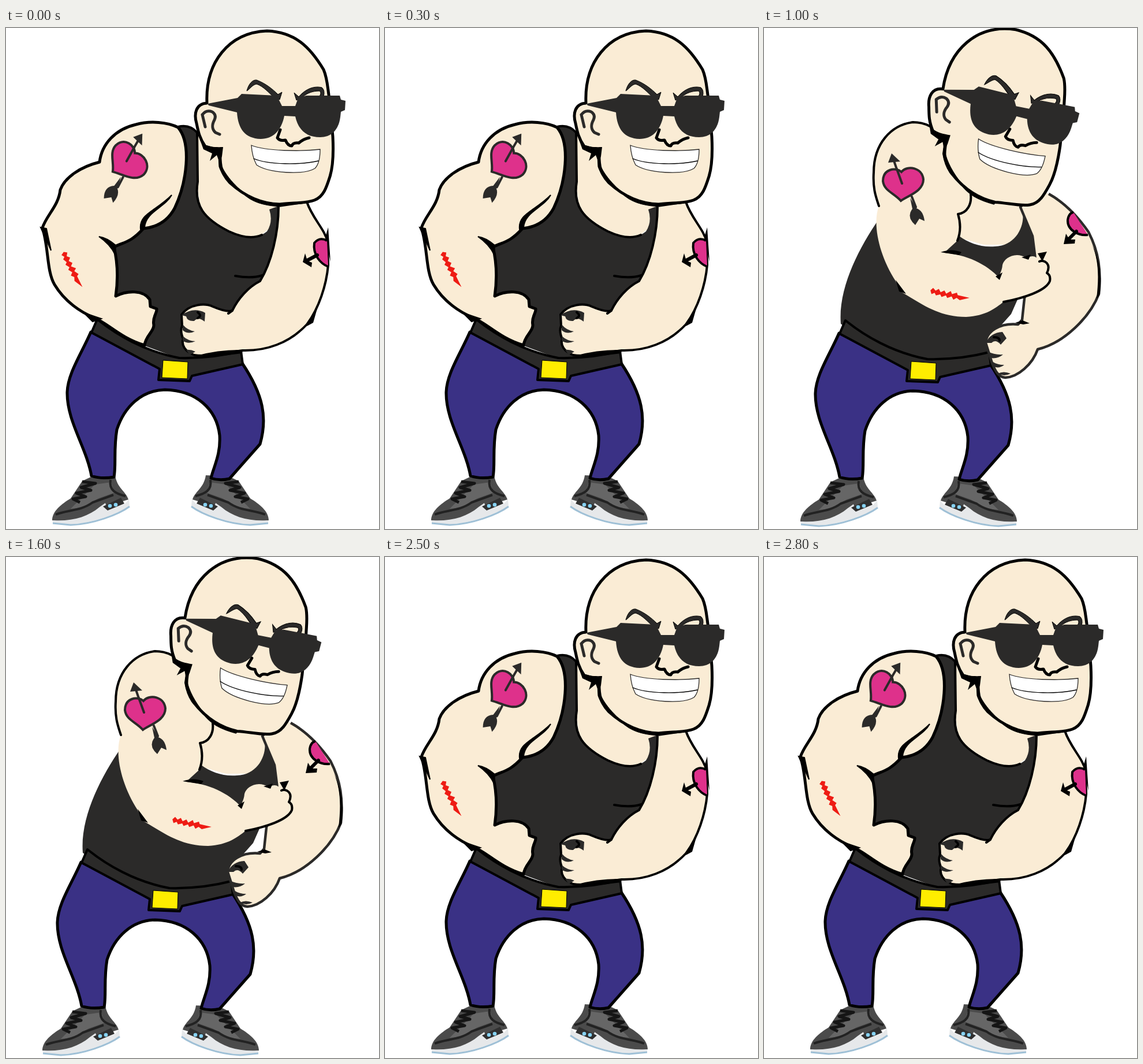
An HTML page for the animation above (3000 ms loop, 646 by 867 pixels).

```html
<!DOCTYPE html>
<html lang="en">
<head>
<meta charset="utf-8">
<title>Strongman</title>
<style>
  html, body { margin: 0; width: 100%; height: 100%; overflow: hidden; background: #fff; }
  svg { display: block; width: 100vw; height: 100vh; }

  .skin { fill: #faecd5; }
  .dark { fill: #2b2a29; }
  .ink { fill: #000; }
  .pink { fill: #de318b; }
  .edge { stroke: #000; stroke-width: 5; stroke-linejoin: round; }
  .soft { stroke: #2b2a29; stroke-width: 4.5; stroke-linejoin: round; }
  .line { fill: none; stroke: #000; stroke-width: 4; stroke-linecap: round; stroke-linejoin: round; }
  .gray { stroke: #2b2a29; }
  .thin { stroke-width: 1.3; }

  .pose { visibility: hidden; animation: 3s step-end infinite; }
  #flex { animation-name: flex; }
  #swing { animation-name: swing; }
  #curl { animation-name: curl; }
  @keyframes flex {
    0%, 83.333% { visibility: visible; }
    16.666%, 100% { visibility: hidden; }
  }
  @keyframes swing {
    0%, 33.333%, 83.333%, 100% { visibility: hidden; }
    16.666%, 66.666% { visibility: visible; }
  }
  @keyframes curl {
    0%, 66.666%, 100% { visibility: hidden; }
    33.333% { visibility: visible; }
  }
</style>
</head>
<body>
<svg viewBox="0 0 646 867" preserveAspectRatio="none">
  <defs>
    <g id="shoe">
      <path fill="#4b4b4b" d="M149 776L132 784L112 814C96 824 80 836 80 852L112 856L150 846L172 828L212 816C208 802 192 796 189 774Z"/>
      <path fill="#666" d="M154 790L182 786L188 804L160 814L132 830L112 832Z"/>
      <path fill="#e6e8ea" d="M213 816L214 827C195 840 150 857 112 859L81 857L81 852C115 854 142 846 162 829L172 822L176 835L205 824Z"/>
      <path fill="#303030" d="M168 828L199 813L205 823L176 835Z"/>
      <path fill="none" stroke="#9fc0d6" stroke-width="3" d="M214 828C195 842 150 859 112 860L81 857"/>
      <path fill="none" stroke="#222" stroke-width="4" d="M181 782C178 800 190 806 207 810M86 842C105 834 130 836 150 821L186 808"/>
      <path fill="none" stroke="#151515" stroke-width="5" stroke-linejoin="round" d="M132 785L155 788L130 795L147 800L122 805L138 811L116 815L128 821"/>
      <circle cx="180" cy="827" r="3.3" fill="#86d2f4"/>
      <circle cx="190" cy="825" r="3.3" fill="#86d2f4"/>
    </g>

    <g id="legs">
      <use href="#shoe"/>
      <use href="#shoe" transform="matrix(-1 0 0 1 535 0)"/>
      <path class="edge" fill="#3a3185" d="M147 526C130 565 107 598 106 630C105 680 139 725 148 775Q165 781 187 777C191 755 186 730 192 695C205 655 235 627 275 626C330 627 365 660 370 705C372 738 360 758 355 779Q370 784 387 780L440 720C453 675 446 635 409 580L300 600Z"/>
      <path class="dark edge" style="stroke-width:4" d="M158 504C190 530 240 560 300 571C340 572 380 566 407 559L410 582L322 602L318 611L264 609L266 590L148 527Z"/>
      <path fill="#ffed00" stroke="#000" stroke-width="1" d="M272 575L315 578L314 607L270 605Z"/>
    </g>

    <g id="head">
      <path class="skin edge" d="M348 130C345 60 385 8 452 5C500 7 526 32 550 72C557 88 557 105 560 122L566 188C567 208 567 238 561 257C555 276 550 292 534 298C518 304 494 302 474 305C440 304 412 290 388 268C373 252 370 240 371 212L345 205C335 190 333 180 330 165C325 148 329 131 348 130Z"/>
      <path class="skin" d="M345 134L380 130L395 215L369 211L372 200L350 190Z"/>
      <path class="ink" d="M334 188C340 203 350 207 376 206L374 222L370 233L365 220L353 230L357 217L342 210Z"/>
      <path class="line gray" style="stroke-width:5" d="M340 150Q347 141 357 145Q365 150 361 159C356 168 357 176 363 181L370 184M340 150L345 171"/>
      <path class="ink" stroke="#000" d="M368 222C372 244 388 266 416 289L434 297C404 287 376 262 369 240ZM410 286C435 300 455 302 475 304L473 309C445 307 425 301 410 286Z"/>
      <path class="dark" stroke="#000" d="M417 109C420 97 427 89 434 90C450 96 462 106 471 115L478 111L474 124L464 120C455 112 446 101 434 97C427 98 423 105 417 109ZM499 112L507 119C520 104 535 100 547 103Q553 108 550 119L543 118Q547 112 543 109C532 109 522 112 513 120L503 125Z"/>
      <path class="line" style="stroke-width:5" d="M475 176L470 190Q474 196 484 194Q488 204 495 204Q497 198 507 199Q515 192 525 190"/>
      <path class="dark" d="M349 131L401 121L408 114L469 117L478 135H501L506 121L520 117H578L580 124L588 126L587 142L580 145L579 154C576 178 562 189 544 189C520 189 506 176 501 153L482 152C477 178 462 192 441 192C414 191 402 175 400 146L351 134Z"/>
      <path class="thin" fill="#fff" stroke="#2b2a29" d="M425 203C450 213 510 214 544 210C544 224 542 236 535 243C515 255 455 251 434 237Q426 222 425 203Z"/>
      <path class="line thin" d="M429 226C455 237 510 237 541 230"/>
    </g>

    <g id="tattoo">
      <path class="line gray" d="M-20 -53L-4 -6M14 18L21 36"/>
      <path class="dark" d="M-21 -57L-27 -41L-6 -43ZM11 20L22 38Q34 42 36 60L27 56L20 67Q4 53 15 39Z"/>
      <path class="pink" stroke="#2b2a29" stroke-width="4" d="M-4 -25C-14 -34 -36 -30 -36 -9C-34 8 -16 12 -5 25C10 15 34 8 34 -12C32 -33 6 -37 -4 -25Z"/>
      <path class="line gray" d="M-12 -30L-3 -5"/>
    </g>

    <path id="scar" fill="#ee1c14" d="M0 -1L4 -6L9 -2L14 -6L18 -1L24 -5L28 0L35 -6L38 -1L46 -5L48 -1L69 0L53 7L47 4L42 8L38 3L31 7L28 3L21 7L18 3L11 6L8 2L3 5Z"/>
  </defs>

  <g id="flex" class="pose">
    <path class="skin" d="M320 180H480L475 308L460 345L430 366L340 340Z"/>
    <path class="dark" d="M298 171Q318 166 331 181L332 266C325 308 343 330 386 352C412 364 438 364 452 352Q463 335 456 314L472 308L470 360C465 400 452 430 440 442L400 480L390 565L300 572L200 535L190 462L187 378L245 345L290 318C315 260 322 215 298 171Z"/>
    <path class="line" d="M298 171Q318 166 331 181L332 266C325 308 343 330 386 352C412 364 430 364 443 358"/>
    <use href="#legs"/>
    <path class="skin edge" d="M298 172C280 163 250 160 225 167C190 175 166 200 162 232C130 240 102 258 94 280C91 308 70 324 63 346C74 378 70 420 84 444C102 474 130 492 152 501C175 510 200 538 240 549C242 532 256 526 256 514C253 500 262 494 261 486L250 482L249 470C238 453 210 454 190 464C195 430 192 400 187 379C205 370 215 372 238 347C270 344 285 325 292 312C313 268 322 200 298 172Z"/>
    <path class="ink" stroke="#000" stroke-width="2" d="M287 289C275 311 242 318 240 345L233 348C230 322 258 318 287 289ZM161 361Q175 363 190 376L189 392Q180 374 161 361ZM60 345L70 347L78 385ZM135 493L165 503L150 508Z"/>
    <path class="skin edge" style="stroke-width:4" d="M472 308L521 301C531 330 552 348 557 370L558 410C555 445 542 485 521 513C490 546 450 559 410 558C385 561 350 570 326 566C310 560 303 548 307 538Q301 525 305 515L304 496C318 477 345 476 358 482C372 488 384 492 392 489C402 468 420 448 440 438C460 405 472 355 472 308Z"/>
    <path class="ink" d="M330 567Q370 556 410 557L409 563Q370 568 330 572ZM558 345L562 405L553 362ZM552 440L532 510L521 516Q542 480 552 440Z"/>
    <path class="line" d="M397 429Q425 434 444 428M385 494L392 489"/>
    <path class="dark" d="M304 497Q325 482 345 493L344 508Q333 499 326 507Q314 508 312 499ZM306 513Q314 523 327 525Q315 531 306 523ZM306 533Q316 542 328 542Q315 548 306 541ZM312 557Q320 556 328 560L318 566Z"/>
    <path class="line" d="M332 492Q340 498 332 502"/>
    <path class="pink edge" style="stroke-width:4" d="M558 413C545 408 531 393 534 372Q543 361 556 368"/>
    <path class="line" style="stroke-width:6" d="M539 393L522 402"/>
    <path class="ink" d="M518 390L514 405L529 414L530 406L522 403Z"/>
    <use href="#tattoo" transform="translate(207 236) rotate(49)"/>
    <use href="#scar" transform="translate(99 388) rotate(61)"/>
    <use href="#head"/>
  </g>

  <g id="swing" class="pose">
    <path class="skin edge soft" d="M440 268C480 260 525 268 553 280C585 305 612 342 614 380L609 408C627 422 646 450 642 478L635 493L568 498L554 487L551 450L558 418C532 412 506 398 494 376C470 366 440 362 408 362L395 308Z"/>
    <path class="ink" d="M495 266Q535 268 556 283L535 276ZM556 416L566 409L560 426Z"/>
    <path class="dark" d="M559 461Q570 454 581 464L572 466Q584 474 578 485L566 494Q576 477 566 474ZM594 473Q605 472 606 489L598 481ZM615 469Q625 469 622 485ZM632 464Q641 466 636 483L630 489Q635 474 632 464Z"/>
    <path class="skin" d="M235 190H440L400 308L385 345L350 360L260 315Z"/>
    <path class="dark" d="M251 225L260 312C285 345 320 360 352 359C378 357 388 340 388 306H401C414 335 412 390 397 445C382 498 352 538 329 558L260 580L80 510L96 440L188 395L211 345L240 318C252 285 250 255 251 225Z"/>
    <path class="line" d="M253 230L260 312C285 345 320 360 352 359C378 357 386 342 388 308M401 308C414 335 412 390 397 445C388 478 372 505 358 526"/>
    <use href="#legs" transform="translate(-77.5 -3.5)"/>
    <path class="skin" d="M215 167C165 168 110 190 103 268C75 290 62 330 65 365C60 400 62 425 82 438C98 478 130 510 180 518C220 528 270 533 297 530L304 520Q298 515 310 500Q312 488 304 485Q307 469 290 462C282 451 258 450 248 458C239 470 234 474 228 478C212 450 200 415 186 402Q198 390 210 374L212 345L240 318C251 285 252 255 250 225Z"/>
    <path class="line soft" d="M215 168C165 168 110 190 103 268C75 290 62 330 65 365C60 400 62 425 82 438"/>
    <path class="ink" d="M242 272C229 290 211 310 213 343L222 344C220 315 240 304 242 272ZM158 393Q180 396 190 403C208 417 216 446 233 472L229 478C214 452 206 416 185 404ZM278 464L296 466L291 471Z"/>
    <path class="pink edge" style="stroke-width:4" d="M423 288Q440 285 446 273L430 278Z"/>
    <path class="line" style="stroke-width:5" d="M431 286L446 301"/>
    <path class="ink" d="M450 291L453 309L432 307L434 302L444 303Z"/>
    <use href="#tattoo" transform="translate(152 262) rotate(24)"/>
    <use href="#scar" transform="translate(115 448) rotate(35)"/>
    <path class="line thin" stroke-dasharray="4 3" d="M372 309L389 308M380 314L386 315"/>
    <use href="#head" transform="translate(-116 -.5) rotate(-8 477 169.5)"/>
  </g>

  <g id="curl" class="pose">
    <path class="skin" d="M300 190L480 250L465 360L440 375H380L335 362Z"/>
    <path class="dark" d="M198 332C165 380 128 450 133 512C180 545 240 572 300 580L394 572L388 540L428 495L470 400L465 355L446 312C455 335 440 377 400 378C375 380 355 372 338 360L312 389Z"/>
    <use href="#legs" transform="translate(-17 2)"/>
    <path class="skin soft" d="M493 287C520 302 544 327 562 353C580 388 584 420 580 460C565 500 520 545 474 556C465 582 440 604 418 605C405 604 400 592 395 580L384 545C385 525 408 510 440 513L447 505L451 468L470 400L465 360L444 310L470 280"/>
    <path class="ink" d="M568 375C583 405 586 435 581 463L576 468C580 432 580 402 568 375ZM435 510L448 506L460 511L449 513Z"/>
    <path class="dark" d="M384 545Q392 527 413 526L420 537L410 548Q401 538 394 545ZM388 560Q399 566 414 565Q405 573 392 571ZM395 577Q404 583 416 583Q407 590 398 586ZM405 598Q415 593 427 598Q416 604 405 598Z"/>
    <path class="line" d="M398 535Q408 535 408 541"/>
    <path class="skin" d="M310 195C300 170 275 163 258 163C220 168 190 200 190 250C188 280 195 295 199 308C187 340 200 395 228 438L238 457C270 475 300 500 350 500C385 498 400 485 415 474C450 467 488 455 495 438Q497 428 490 424C498 408 485 400 477 404Q470 390 455 398C435 386 416 398 413 410C412 424 404 430 408 433C385 408 350 392 312 389L335 368C342 350 340 335 336 322C352 320 360 305 358 288"/>
    <path class="line soft" d="M310 195C300 170 275 163 258 163C220 168 190 200 190 250C188 280 195 295 199 308M415 474C450 467 488 455 495 438Q497 428 490 424C498 408 485 400 477 404M335 368C342 350 340 335 336 322C352 320 360 305 358 288"/>
    <path class="ink" d="M306 388Q325 381 342 388L338 393ZM446 397L462 392L458 401ZM474 390L490 387L482 404ZM401 430L413 423L408 436ZM228 436L246 460L234 456Z"/>
    <path class="pink edge" style="stroke-width:4" d="M561 358C545 360 525 350 526 332Q528 320 536 319"/>
    <path class="line" style="stroke-width:6" d="M541 352L527 366"/>
    <path class="ink" d="M523 356L519 374L538 373L539 366L529 366Z"/>
    <use href="#tattoo" transform="translate(242 274)"/>
    <use href="#scar" transform="translate(288 455) rotate(10)"/>
    <use href="#head" transform="translate(-48 -.5) rotate(11 477 169.5)"/>
  </g>
</svg>
</body>
</html>
```
